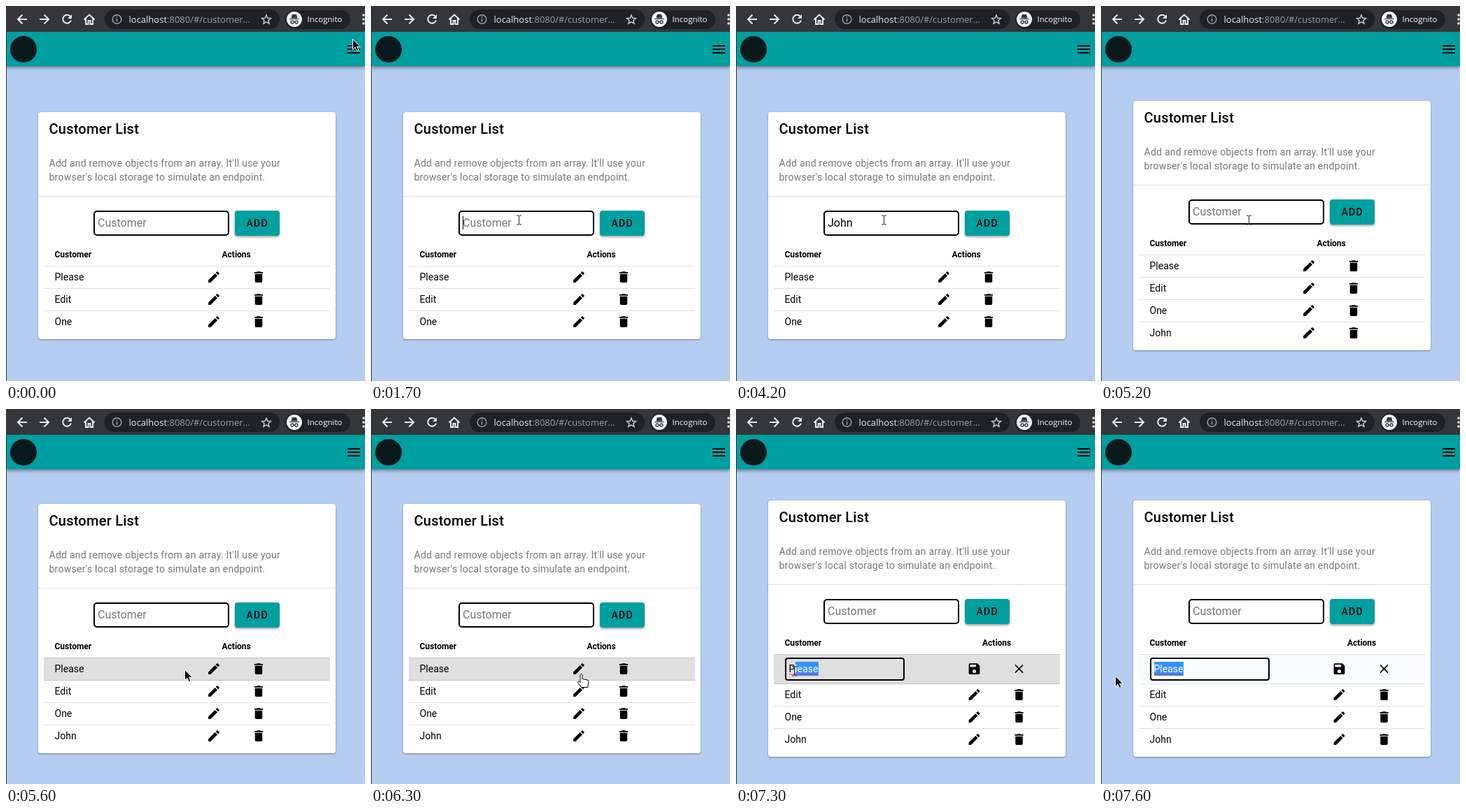
These frames come from a looping animation (513x537 px, 8000 ms). An HTML page:

```html
<!DOCTYPE html>
<html lang="en">
<head>
<meta charset="utf-8">
<title>Customer List</title>
<style>
  html, body { margin: 0; height: 100%; overflow: hidden; background: #b4cdf1; }
  svg { display: block; width: 100vw; height: 100vh; font: 14px Roboto, sans-serif; }
  text { white-space: pre; }
  .ui { font-family: "Open Sans", sans-serif; }
  .line { fill: none; stroke: #e8eaed; stroke-width: 2; }
  .title { font-size: 20px; font-weight: 500; letter-spacing: .25px; }
  .sub { letter-spacing: .25px; fill: rgba(0, 0, 0, .54); }
  .field { font-size: 16px; }
  .th { font-size: 12px; font-weight: 700; }
  .add { font-weight: 500; letter-spacing: 1.25px; }
  .card { fill: #fff; filter: drop-shadow(0 1px 1px rgba(0, 0, 0, .38)); }
  .button { fill: #009fa0; filter: drop-shadow(0 2px 1.5px rgba(0, 0, 0, .35)); }
  .bar { fill: #009fa0; filter: drop-shadow(0 2px 2.5px rgba(0, 0, 0, .45)); }
  .rule { fill: rgba(0, 0, 0, .12); }
</style>
</head>
<body>
<svg viewBox="0 0 513 537">
  <rect width="513" height="537" fill="#b4cdf1"/>
  <rect class="bar" y="37" width="513" height="49"/>
  <circle cx="25" cy="62" r="19" fill="#0a191c"/>
  <path d="M488 57h18M488 62h18M488 67h18" stroke="#000" stroke-width="2"/>
  <rect y="37" width="1" height="500" fill="#35363a"/>

  <!-- browser toolbar -->
  <rect width="513" height="37" fill="#35363a"/>
  <g class="line">
    <path d="M30 19H17.500M23.500 12.500L17 19l6.500 6.500"/>
    <path d="M48 19h12.500M54.500 12.500L61 19l-6.500 6.500" />
    <path d="M92 15a6 6 0 1 0 1 5.500"/>
    <path d="M94 12v6h-6z" fill="#e8eaed" stroke="none"/>
    <path d="M111.500 19.500L119 12.500l7.500 7M114 18v8h3.500v-5h3v5h3.500v-8"/>
  </g>
  <rect x="141" y="5" width="250" height="28" rx="14" fill="#202124"/>
  <g fill="none" stroke="#9aa0a6" stroke-width="1.500">
    <circle cx="158.500" cy="19" r="6.300"/>
    <path d="M158.500 18v4.500M158.500 15v1.600"/>
    <path d="M372 13l1.800 4.300 4.600.4-3.500 3 1.100 4.500-4-2.400-4 2.400 1.100-4.500-3.500-3 4.600-.4z" stroke="#c4c7cb"/>
  </g>
  <text class="ui" x="175.500" y="24" font-size="13" fill="#9aa0a6"><tspan fill="#e8eaed">localhost</tspan>:8080/#/customer…</text>
  <rect x="399" y="6" width="93" height="27" rx="13.500" fill="#202124"/>
  <circle cx="412" cy="19" r="11" fill="#f1f3f4"/>
  <path d="M405 18.500h14M408 17l1.300-4.500h5.400L416 17z" fill="#35363a" stroke="#35363a"/>
  <path d="M411 23q1-.8 2 0" stroke="#35363a" fill="none"/>
  <g fill="none" stroke="#35363a" stroke-width="1.300"><circle cx="409" cy="23" r="2"/><circle cx="415" cy="23" r="2"/></g>
  <text class="ui" x="430.500" y="23" font-size="11.500" fill="#fff">Incognito</text>
  <g fill="#e8eaed"><circle cx="511" cy="13" r="1.800"/><circle cx="511" cy="19" r="1.800"/><circle cx="511" cy="25" r="1.800"/></g>

  <g id="card"></g>
  <g id="cursor"></g>
</svg>
<script>
const LOOP = 8000, STEP = 100;
const ADDED = 4300, EDITING = 6500, FOCUSED = 7000, DRAGGING = 7200;

const icons = {
  edit: 'M3 17.250V21h3.750L17.800 9.940l-3.750-3.750zM20.700 7a1 1 0 0 0 0-1.400l-2.300-2.300a1 1 0 0 0-1.400 0l-1.900 1.800 3.750 3.750z',
  remove: 'M6 19a2 2 0 0 0 2 2h8a2 2 0 0 0 2-2V7H6zM19 4h-3.500l-1-1h-5l-1 1H5v2h14z',
  save: 'M17 3H5a2 2 0 0 0-2 2v14a2 2 0 0 0 2 2h14a2 2 0 0 0 2-2V7zM12 19a3 3 0 1 1 0-6 3 3 0 0 1 0 6zM15 9H5V5h10z',
  close: 'M19 6.400L17.600 5 12 10.600 6.400 5 5 6.400 10.600 12 5 17.600 6.400 19l5.600-5.600 5.600 5.600 1.400-1.400-5.600-5.600z'
};
const pointers = {
  arrow: '<path d="M0 0v15l3.500-3.300 2.300 5.300 2.600-1.100-2.300-5.200h4.700z" stroke="#fff"/>',
  beam: '<path d="M-3.500-6.500h2.500l1 1 1-1h2.500M0-5.500v11M-3.500 6.500h2.500l1-1 1 1h2.500" fill="none" stroke="#222"/>',
  hand: '<path d="M-1.500 1q1.500-2 3 0v6l7 1.500q2 .5 2 2.500l-1 6v2H0l-5-7q0-2 2-1.500l1.500 1.500z" fill="#fff" stroke="#000"/>'
};

// time, x, y
const track = [
  [0, 495, 47], [100, 466, 58], [300, 285, 143], [400, 232, 186], [500, 211, 306],
  [5200, 211, 306], [5400, 235, 340], [5600, 255, 373], [5800, 268, 448],
  [6000, 276, 384], [6300, 300, 379], [6500, 300, 379], [6600, 299, 379],
  [7000, 120, 372], [7100, 120, 372], [7200, 104, 372], [7600, 20, 382], [LOOP, 20, 382]
];
const typing = [2000, 2400, 2600, 2800];
const caretOn = [[700, 1200], [1700, 3300], [3700, 4200], [4700, 5200], [5700, 6200]];
const letterEdges = [76, 84.8, 88.2, 95.6, 103.3, 110.5, 117.9];

const card = document.getElementById('card');
const cursor = document.getElementById('cursor');

const inside = (p, x, y, w, h) => p.x >= x && p.x < x + w && p.y >= y && p.y < y + h;
const rect = (x, y, w, h, attrs) => `<rect x="${x}" y="${y}" width="${w}" height="${h}" ${attrs}/>`;
const text = (x, y, cls, s, attrs = '') => `<text x="${x}" y="${y}" class="${cls}" ${attrs}>${s}</text>`;
const icon = (name, x, y) =>
  `<path d="${icons[name]}" fill-rule="evenodd" transform="translate(${x - 10.5} ${y - 10.5}) scale(.875)"/>`;

function pointerAt(t) {
  const i = track.findIndex(k => k[0] > t);
  const [t0, x0, y0] = track[i - 1], [t1, x1, y1] = track[i];
  const k = (t - t0) / (t1 - t0);
  return { x: x0 + (x1 - x0) * k, y: y0 + (y1 - y0) * k };
}

function mainField(t) {
  const typed = t < ADDED ? 'John'.slice(0, typing.filter(k => k <= t).length) : '';
  const blink = caretOn.some(([a, b]) => t >= a && t < b);
  const caretX = typed ? 130 + 9 * typed.length : 131;
  return rect(126, 142, 192, 34, 'rx="4" fill="#fff" stroke="#000" stroke-width="2"') +
    text(131, 164, 'field', typed || 'Customer', typed ? '' : 'fill="#757575"') +
    (blink ? rect(caretX, 149, 1, 19, '') : '');
}

function editField(t, p, y) {
  const focused = t >= FOCUSED, word = 'Please';
  let from = word.length;
  if (t >= DRAGGING) from = Math.max(0, letterEdges.findIndex(x => x >= p.x - 4));
  const start = letterEdges[from], end = letterEdges[word.length];
  let out = rect(71, y + 6, 169, 31,
    `rx="${focused ? 3 : 0}" fill="none" stroke="${focused ? '#000' : '#767676'}" stroke-width="2"`);
  if (from < word.length) out += rect(start, y + 11, end - start, 20, 'fill="#3390ff"');
  out += text(75.5, y + 26, '', `${word.slice(0, from)}<tspan fill="#fff">${word.slice(from)}</tspan>`);
  if (focused) {
    out += `<path d="M76 ${y + 30}${'l2-2 2 2'.repeat(10)}" fill="none" stroke="#e0304a"/>`;
    if (t < DRAGGING) out += rect(117, y + 12, 1, 18, '');
  }
  return out;
}

function draw(t) {
  const p = pointerAt(t), editing = t >= EDITING;
  const names = ['Please', 'Edit', 'One'].concat(t >= ADDED ? 'John' : []);
  const height = 229 + 32 * names.length + (editing ? 10 : 0);
  const top = Math.floor(314.5 - height / 2);
  const local = { x: p.x, y: p.y - top };
  const shift = editing ? 43.5 : 0;

  let out = rect(46, 0, 425, height, 'rx="4" class="card"') +
    text(61.5, 31, 'title', 'Customer List') +
    text(61.5, 78, 'sub', "Add and remove objects from an array. It'll use your") +
    text(61.5, 98, 'sub', "browser's local storage to simulate an endpoint.") +
    rect(46, 120, 425, 1, 'class="rule"') +
    mainField(t) +
    rect(327, 141, 64, 36, 'rx="4" class="button"') +
    text(343.5, 164, 'add', 'ADD') +
    text(69.5, 208, 'th', 'Customer') +
    text(308.5 + shift, 208, 'th', 'Actions');

  let y = 220, hand = false;
  names.forEach((name, i) => {
    const edit = editing && i === 0, h = edit ? 42 : 32, mid = y + h / 2;
    if (inside(local, 54, y + 1, 409, h)) out += rect(54, y, 409, h + 1, 'fill="#dfdfdf"');
    else if (edit && t >= FOCUSED) out += rect(54, y, 409, h, 'fill="#f8fcff"');
    out += rect(54, y, 409, 1, 'class="rule"');
    out += edit ? editField(t, p, y) : text(69.5, mid + 5, '', name);
    out += icon(edit ? 'save' : 'edit', 297 + shift, mid) + icon(edit ? 'close' : 'remove', 361 + shift, mid);
    hand = hand || inside(local, 286 + shift, mid - 11, 22, 22);
    y += h;
  });
  card.setAttribute('transform', `translate(0 ${top})`);
  card.innerHTML = out;

  const beam = inside(local, 125, 141, 194, 36) || (editing && inside(local, 70, 225, 171, 33));
  cursor.setAttribute('transform', `translate(${Math.round(p.x) + .5} ${Math.round(p.y) + .5})`);
  cursor.innerHTML = pointers[beam ? 'beam' : hand ? 'hand' : 'arrow'];
}

let shown = -1;
function tick() {
  const t = Math.floor(performance.now() % LOOP / STEP) * STEP;
  if (t !== shown) draw(shown = t);
  requestAnimationFrame(tick);
}
tick();
</script>
</body>
</html>
```
